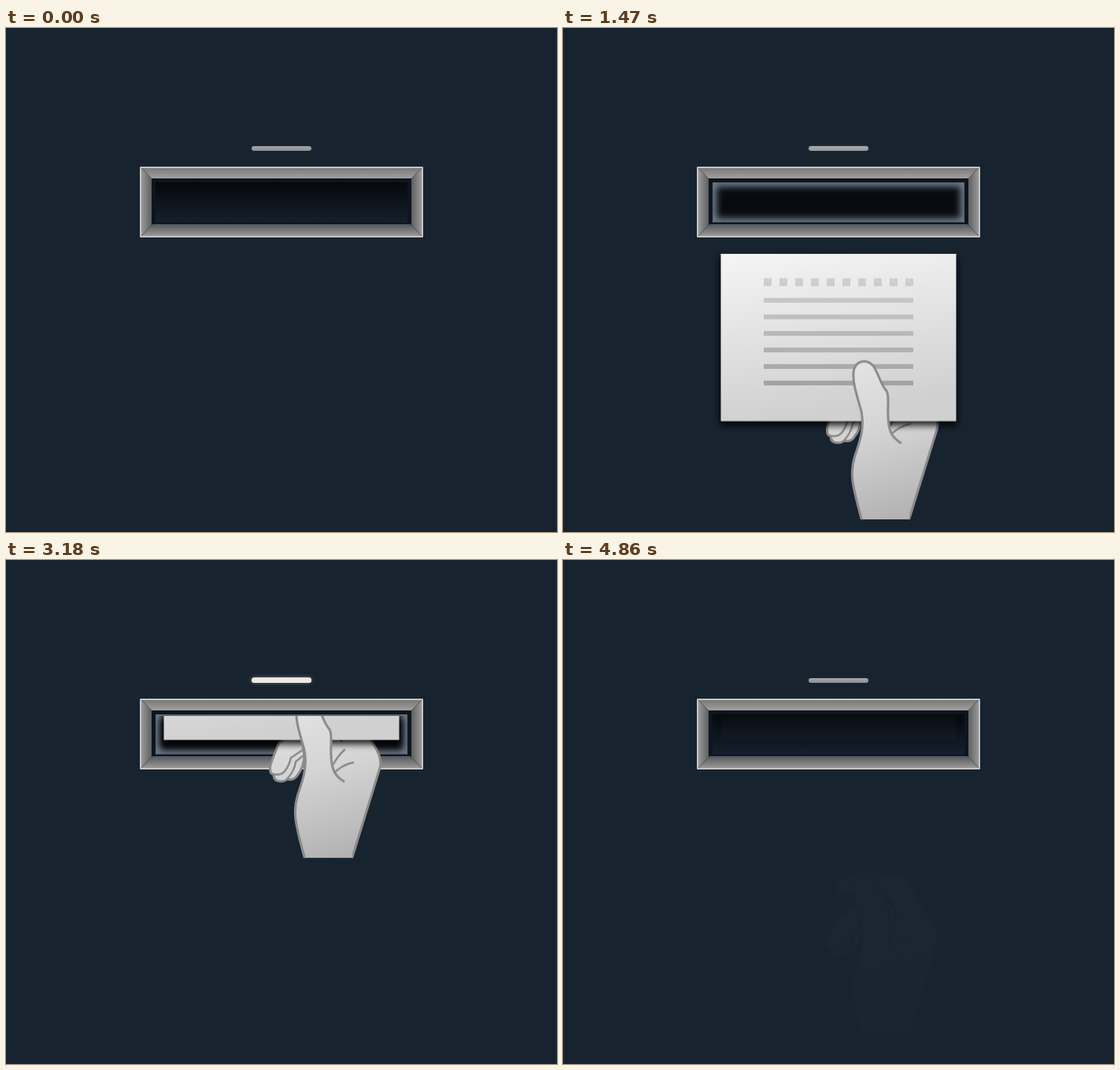
Recreate the animation shown at these times as an HTML page. Size 700 by 640 pixels, loop 4980 ms.

```html
<!DOCTYPE html>
<html lang="en">
<head>
<meta charset="utf-8">
<title>Letter slot</title>
<style>
  html, body { margin: 0; width: 100%; height: 100%; overflow: hidden; background: #17232f; }
  svg { display: block; width: 700px; height: 640px; }
  .skin { fill: url(#skin); }
  .edge { fill: none; stroke: #8b8b8b; stroke-width: 3; stroke-linecap: round; stroke-linejoin: round; }
</style>
</head>
<body>
<svg viewBox="0 0 700 640">
  <defs>
    <linearGradient id="top" x2="0" y2="1"><stop stop-color="#747474"/><stop offset="1" stop-color="#a19f9d"/></linearGradient>
    <linearGradient id="bottom" x2="0" y2="1"><stop stop-color="#5a5a5a"/><stop offset="1" stop-color="#a2a2a2"/></linearGradient>
    <linearGradient id="left"><stop stop-color="#a2a2a2"/><stop offset="1" stop-color="#5f5f5f"/></linearGradient>
    <linearGradient id="right"><stop stop-color="#5f5f5f"/><stop offset="1" stop-color="#a2a2a2"/></linearGradient>
    <linearGradient id="hole" x2="0" y2="1"><stop stop-color="#06090d"/><stop offset="1" stop-color="#15202b"/></linearGradient>
    <linearGradient id="lamp" x2="0" y2="1"><stop stop-color="#a1a6a8"/><stop offset="1" stop-color="#8b9294"/></linearGradient>
    <linearGradient id="paper" x2=".2" y2="1"><stop stop-color="#f5f5f5"/><stop offset="1" stop-color="#d0d0d0"/></linearGradient>
    <linearGradient id="ink" gradientUnits="userSpaceOnUse" x1="0" y1="318" x2="0" y2="454"><stop stop-color="#d0d0d0"/><stop offset="1" stop-color="#a2a2a2"/></linearGradient>
    <linearGradient id="skin" gradientUnits="userSpaceOnUse" x1="375" y1="365" x2="430" y2="567"><stop stop-color="#e4e4e4"/><stop offset=".45" stop-color="#d4d4d4"/><stop offset="1" stop-color="#b2b2b2"/></linearGradient>
    <filter id="soft" filterUnits="userSpaceOnUse" x="0" y="0" width="700" height="640"><feGaussianBlur stdDeviation="4"/></filter>
    <filter id="halo" filterUnits="userSpaceOnUse" x="290" y="130" width="120" height="45"><feGaussianBlur stdDeviation="2.5"/></filter>
    <clipPath id="inside"><rect x="190" y="196" width="320" height="51"/></clipPath>
    <clipPath id="below"><rect y="198.5" width="700" height="442"/></clipPath>
  </defs>

  <rect width="700" height="640" fill="#17232f"/>

  <rect x="312" y="150" width="76" height="6" rx="3" fill="url(#lamp)"/>
  <g id="light">
    <rect x="312" y="149.5" width="76" height="6" rx="3" fill="#fff3d0" opacity=".55" filter="url(#halo)"/>
    <rect x="312" y="149" width="76" height="7" rx="3.5" fill="#fffaf0"/>
  </g>

  <path fill="url(#top)" d="M170 176H530L515 191H185Z"/>
  <path fill="url(#bottom)" d="M185 250H515L530 266H170Z"/>
  <path fill="url(#left)" d="M170 176L185 191V250L170 266Z"/>
  <path fill="url(#right)" d="M530 176L515 191V250L530 266Z"/>
  <path fill="none" stroke="#555" stroke-opacity=".7" d="M171 177L185 191M529 177L515 191M171 265L185 250M529 265L515 250"/>
  <rect x="171" y="177" width="358" height="88" rx="1" fill="none" stroke="#c4c4c4" stroke-width="2"/>
  <rect x="185" y="191" width="330" height="59" fill="#0d151f"/>
  <rect x="190" y="196" width="320" height="51" fill="url(#hole)"/>
  <path fill="none" stroke="#4c5762" d="M186 249.5H514"/>
  <g id="glow" clip-path="url(#inside)">
    <rect x="190" y="196" width="320" height="51" fill="#080c11"/>
    <rect x="190" y="196" width="320" height="51" fill="none" stroke="#77838f" stroke-width="10" filter="url(#soft)"/>
    <path stroke="#46525f" d="M192 246.5H508"/>
  </g>

  <g clip-path="url(#below)">
    <g id="scene">
      <g class="hand">
        <path class="skin" d="M379 567H440L475 453Q478 443 471 430L437 372Q433 365 427 364.500L380 363Q366 366 352 373C343 376 344 388 355 389L371 387L380 420V480Z"/>
        <path class="edge" d="M440 566L475 453Q478 443 471 430L437 372Q433 365 427 364.500L380 363Q366 366 352 373C343 376 344 388 355 389L371 386"/>
        <path class="skin edge" style="fill:url(#skin)" d="M372 403L347 421Q342 432 336 449Q334 461 340 461Q340 470 349 470Q355 470 357 467Q366 470 371 461Q377 454 379 440L376 412Z"/>
        <path class="edge" style="stroke-width:2.500" d="M377 430L362 440Q360 449 355 456Q350 463 341 461M378 437L368 445Q367 456 357 467"/>
        <path fill="#505050" d="M406 389Q420 399 428 421Q423 418 418 408Q414 402 410 402Z"/>
        <path class="edge" style="stroke-width:2.500" d="M414 462Q426 449 441 446M416 448Q422 437 430 430"/>
      </g>
      <g id="card">
        <rect x="199" y="291" width="302" height="214" filter="url(#soft)" opacity=".85"/>
        <rect x="200.500" y="287" width="299" height="212.500" fill="url(#paper)"/>
        <path fill="none" stroke="#fff" stroke-opacity=".55" d="M200.500 287.500H499.500"/>
        <g id="lines" fill="none" stroke="url(#ink)"></g>
      </g>
      <g class="hand">
        <path class="skin" d="M379 567C367 522 364 508 371 486C378 466 383 450 379 430C374 411 368 396 369 380C371 365 385 363 394 372C402 384 403 395 411 404C415 411 412 425 413 435C413 455 418 463 429 470L440 505V567Z"/>
        <path class="edge" d="M379 566C367 522 364 508 371 486C378 466 383 450 379 430C374 411 368 396 369 380C371 365 385 363 394 372C402 384 403 395 411 404C415 411 412 425 413 435C413 455 418 463 429 470"/>
      </g>
    </g>
  </g>
</svg>
<script>
const LOOP = 4980;
const EASE = 'ease-in-out';
const $ = id => document.getElementById(id);

// Printed rows: one of squares, six solid.
function addLine(y, height, dash) {
  const path = document.createElementNS('http://www.w3.org/2000/svg', 'path');
  // The tiny slope gives the stroke gradient a valid box.
  path.setAttribute('d', `M255 ${y}L445 ${y + 0.01}`);
  path.setAttribute('stroke-width', height);
  if (dash) path.setAttribute('stroke-dasharray', dash);
  $('lines').append(path);
}
addLine(323, 10, '10 10');
for (let i = 0; i < 6; i++) addLine(346 + i * 21, 6);

// Steps are [ms, value, easing towards the next step].
function play(el, prop, steps, toCss = v => v) {
  const all = [[0, steps[0][1]], ...steps, [LOOP, steps.at(-1)[1]]];
  const frames = all.map(([ms, value, easing = 'linear']) =>
    ({ offset: ms / LOOP, [prop]: toCss(value), easing }));
  const run = el.animate(frames, { duration: LOOP, iterations: Infinity });
  run.startTime = document.timeline.currentTime;
}

const moveY = y => `translate(0px, ${y}px)`;

play($('light'), 'opacity', [
  [0, 0, EASE], [500, 1, EASE], [940, 0], [1300, 0], [3550, 1], [4200, 1], [4750, 0]
]);
play($('glow'), 'opacity', [[550, 0], [910, 1], [4740, 1], [4860, 0]]);
play($('scene'), 'opacity', [[1010, 0], [1440, 1], [4200, 1], [4873, 0]]);
play($('card'), 'transform', [[1445, 0, EASE], [2700, -271]], moveY);
for (const hand of document.querySelectorAll('.hand')) {
  play(hand, 'transform', [
    [1445, 57, EASE], [2700, -214], [3002, -214, EASE], [3808, 34]
  ], moveY);
}
</script>
</body>
</html>
```
